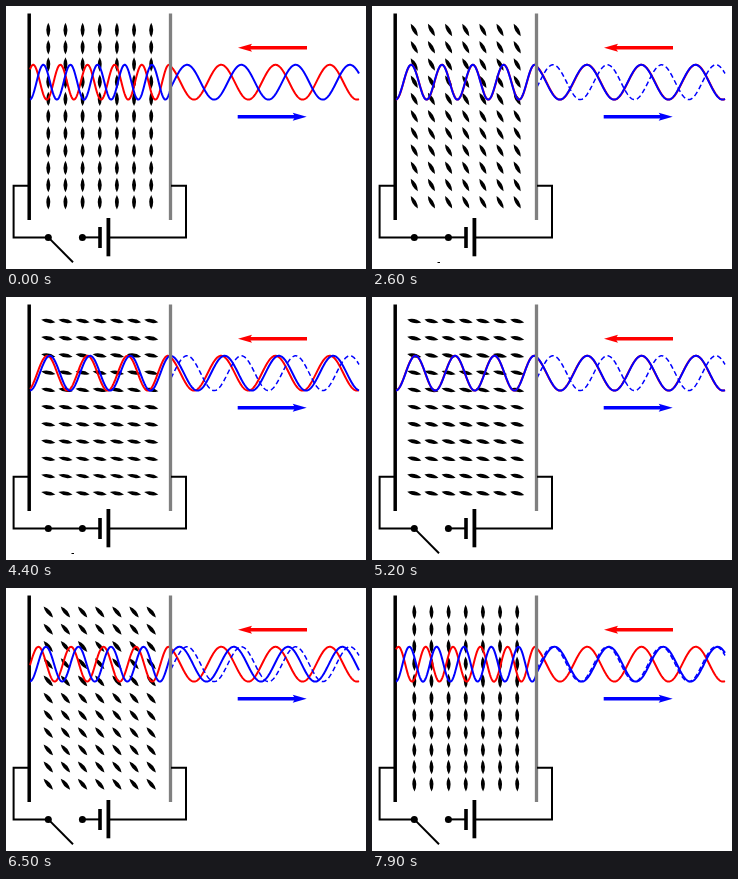
An HTML page with a canvas that plays this animation: 360 px wide and 263 px high, repeating every 8000 ms.

```html
<!DOCTYPE html>
<html lang="en">
<head>
<meta charset="utf-8">
<title>Tunable liquid crystal reflector</title>
<style>
html, body { margin: 0; width: 100%; height: 100%; overflow: hidden; background: #fff; }
canvas { display: block; }
</style>
</head>
<body>
<canvas id="stage" width="360" height="263"></canvas>
<script>
const ctx = document.getElementById('stage').getContext('2d');
const LOOP = 8000, START = 1600, SWEEP = 3200, STEP = 100;
const MIRROR = 23.7, GLASS = 165, WAVELENGTH = 54.3;
const RED = '#f00', BLUE = '#00f', BLACK = '#000';

function line(points, color = BLACK, width = 2, dash = []) {
  ctx.beginPath();
  for (const [x, y] of points) ctx.lineTo(x, y);
  ctx.strokeStyle = color;
  ctx.lineWidth = width;
  ctx.setLineDash(dash);
  ctx.stroke();
}

function dot(x, y) {
  ctx.beginPath();
  ctx.arc(x, y, 3.5, 0, 2 * Math.PI);
  ctx.fillStyle = BLACK;
  ctx.fill();
}

function arrow(tail, tip, y, color) {
  const dir = Math.sign(tip - tail);
  line([[tail, y], [tip - dir * 11, y]], color, 3.5);
  ctx.beginPath();
  ctx.moveTo(tip, y);
  ctx.lineTo(tip - dir * 14, y - 4);
  ctx.lineTo(tip - dir * 11.5, y);
  ctx.lineTo(tip - dir * 14, y + 4);
  ctx.fillStyle = color;
  ctx.fill();
}

// Wave whose phase (in cycles) is known at the glass; the cell has its own index.
function wave(phase, index, color, from = 24, width = 2, dash = []) {
  const points = [];
  for (let x = from; x <= 353; x += 0.5) {
    const cycles = phase + (x - GLASS) * (x < GLASS ? index : 1) / WAVELENGTH;
    points.push([x, 76.2 - 17.4 * Math.cos(2 * Math.PI * cycles)]);
  }
  line(points, color, width, dash);
}

const reflectedPhase = index => 0.5 + (GLASS - MIRROR) * index / WAVELENGTH;

function molecules(angle) {
  ctx.fillStyle = BLACK;
  for (let row = 0; row < 11; row++) {
    for (let col = 0; col < 7; col++) {
      ctx.save();
      ctx.translate(42.3 + col * 17.15, 24 + row * 17.23);
      ctx.rotate(-angle);
      ctx.beginPath();
      ctx.moveTo(0, -7.2);
      ctx.quadraticCurveTo(4, 0, 0, 7.2);
      ctx.quadraticCurveTo(-4, 0, 0, -7.2);
      ctx.fill();
      ctx.restore();
    }
  }
}

function circuit(closed) {
  const y = 231.4;
  line([[23, 179.8], [7.6, 179.8], [7.6, y], [42.3, y]]);
  line([[76.4, y], [93, y]]);
  line([[102, y], [180, y], [180, 179.8], [165, 179.8]]);
  line([[94, 221], [94, 242]], BLACK, 3.6);
  line([[102.4, 212], [102.4, 250.3]], BLACK, 3.8);
  line(closed ? [[42.3, y], [76.4, y]] : [[42.3, y], [67, 256.3]]);
  if (closed) line([[65.5, 256.5], [68, 256.5]], BLACK, 1);
  dot(42.3, y);
  dot(76.4, y);
}

function draw(time) {
  const t = Math.floor(time % LOOP / STEP) * STEP;
  const active = t >= START;
  const elapsed = t - START + STEP / 2;
  const tilt = active ? 1 - Math.abs(1 - elapsed / SWEEP) : 0;
  const index = 2 - 0.73 * tilt;

  ctx.fillStyle = '#fff';
  ctx.fillRect(0, 0, 360, 263);
  molecules(tilt * Math.PI / 2);
  line([[23.2, 7.5], [23.2, 214]], BLACK, 3.5);
  wave((GLASS - 215.2) / WAVELENGTH, index, RED);
  if (active) wave(reflectedPhase(2), 2, BLUE, GLASS, 1.5, [5, 3]);
  wave(reflectedPhase(index), index, BLUE);
  line([[164.5, 7.5], [164.5, 214]], '#808080', 3.3);
  circuit(active && t < START + SWEEP);
  arrow(301, 232, 41.7, RED);
  arrow(231.7, 300.7, 110.7, BLUE);
}

const begin = performance.now();
function tick() {
  draw(performance.now() - begin);
  requestAnimationFrame(tick);
}
tick();
</script>
</body>
</html>
```
